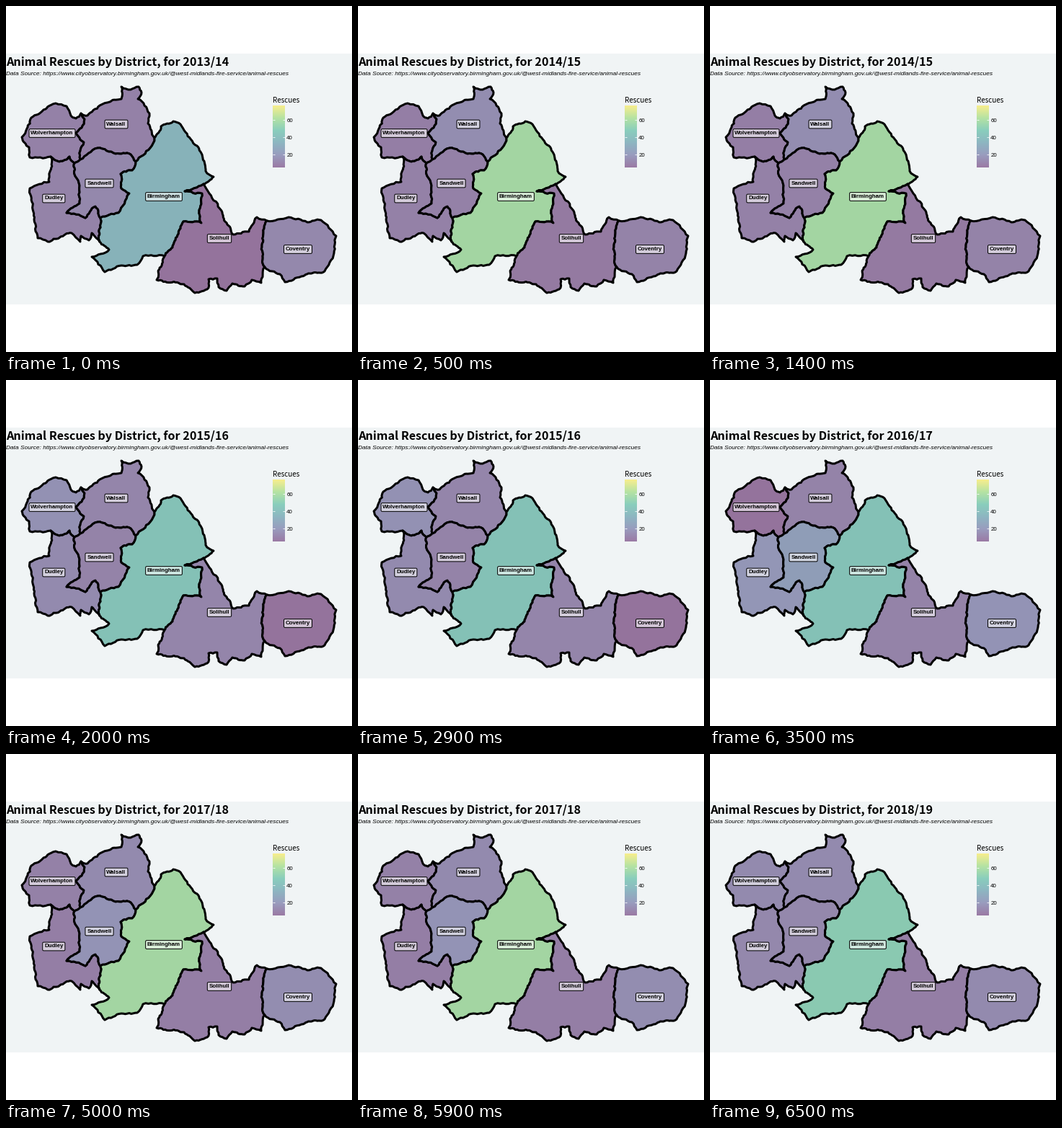
A matplotlib script for the animation above (8 s loop, 480x480 px).

```python
import math
import random

import matplotlib.pyplot as plt
import numpy as np
from matplotlib.animation import FuncAnimation
from matplotlib.colors import LinearSegmentedColormap
from matplotlib.patches import Polygon, Rectangle

SIZE, DPI = 480, 80
PX = 72 / DPI
STEP = 500
FRAMES = 16
LOW, HIGH = 5, 76.7
PANEL = "#f0f4f5"
CMAP = LinearSegmentedColormap.from_list(
    "rescues", ["#440154", "#414487", "#2A788E", "#22A884", "#7AD151", "#FDE725"])

rng = random.Random(7)


def wiggle(a, b):
    """Points after a up to b, with midpoints displaced recursively."""
    dx, dy = b[0] - a[0], b[1] - a[1]
    length = math.hypot(dx, dy)
    if length < 4:
        return [b]
    k = rng.uniform(-1, 1) * min(0.15, 1.5 / length)
    mid = ((a[0] + b[0]) / 2 - k * dy, (a[1] + b[1]) / 2 + k * dx)
    return wiggle(a, mid) + wiggle(mid, b)


def border(*keys):
    path = [keys[0]]
    for a, b in zip(keys, keys[1:]):
        path += wiggle(a, b)
    return path


def ring(*arcs):
    """Join arcs head to tail, turning any that run the other way."""
    path = list(arcs[0])
    for arc in arcs[1:]:
        path += arc if arc[0] == path[-1] else arc[::-1]
    return path


# Corners where borders meet
A, B, C, D = (62, 209), (104, 149), (103, 213), (95, 218)
E, F, G, H = (206, 183), (180, 216), (131, 294), (130, 327)
I, J, K, L = (220, 347), (274, 247), (362, 298), (359, 362)

wolv_out = border(A, (33, 210), (32, 196), (22, 182), (29, 170), (35, 155),
                  (55, 143), (69, 135), (84, 139), (90, 152), (97, 156), B)
wolv_wals = border(B, (109, 157), (105, 169), (97, 176), (108, 189), (103, 201), C)
wolv_sand = border(C, D)
wolv_dud = border(D, (88, 209), (74, 216), A)
wals_out = border(B, (113, 152), (130, 138), (160, 129), (160, 112), (173, 116),
                  (184, 112), (188, 120), (183, 129), (199, 149), (197, 163), E)
wals_birm = border(E, (200, 197), F)
wals_sand = border(F, (173, 206), (152, 205), (127, 197), C)
sand_birm = border(F, (175, 228), (159, 233), (160, 253), (171, 260), (156, 287), G)
sand_dud = border(G, (124, 278), (110, 294), (84, 287), (102, 274), (102, 249),
                  (96, 236), D)
dud_out = border(H, (119, 315), (115, 325), (104, 319), (103, 327), (91, 315),
                 (58, 327), (44, 322), (39, 296), (33, 253), (60, 244), A)
dud_birm = border(G, (129, 311), H)
birm_south = border(H, (143, 338), (119, 348), (137, 369), (160, 360),
                    (182, 359), (190, 347), I)
birm_soli = border(I, (231, 335), (238, 318), (246, 299), (271, 301), (268, 283),
                   (272, 260), (248, 257), J)
birm_east = border(J, (288, 237), (277, 229), (273, 211), (265, 194), (249, 175),
                   (242, 164), (232, 160), (215, 167), E)
soli_north = border(J, (282, 260), (299, 284), (315, 317), (337, 313), (348, 293), K)
soli_cov = border(K, (357, 313), (355, 332), (356, 352), L)
soli_south = border(L, (354, 384), (341, 380), (331, 389), (314, 385), (306, 395),
                    (295, 390), (293, 378), (281, 379), (281, 391), (262, 398),
                    (247, 386), (209, 380), I)
cov_out = border(K, (392, 293), (418, 300), (437, 297), (458, 319), (455, 343),
                 (442, 368), (410, 375), (387, 383), (380, 372), L)

# District: outline, label position, rescues per year
DISTRICTS = {
    "Wolverhampton": (ring(wolv_out, wolv_wals, wolv_sand, wolv_dud),
                      (64, 176.5), (11, 10, 18, 5, 11, 15)),
    "Walsall": (ring(wals_out, wals_birm, wals_sand, wolv_wals),
                (153, 164), (11, 16, 13, 12, 15, 15)),
    "Dudley": (ring(wolv_dud, dud_out, dud_birm, sand_dud),
               (66.3, 267), (12, 11, 15, 20, 10, 14)),
    "Sandwell": (ring(wals_sand, wolv_sand, sand_dud, sand_birm),
                 (129.5, 246), (14, 11, 12, 24, 19, 14)),
    "Birmingham": (ring(wals_birm, sand_birm, dud_birm, birm_south, birm_soli,
                        birm_east),
                   (219, 264.5), (36, 58, 45, 45, 58, 50)),
    "Solihull": (ring(soli_north, soli_cov, soli_south, birm_soli),
                 (296, 322.5), (5, 8, 13, 12, 10, 10)),
    "Coventry": (ring(cov_out, soli_cov),
                 (405, 337.5), (14, 12, 5, 19, 16, 15)),
}


def fill(count):
    """Half-transparent scale colour over a light grey base."""
    rgb = np.array(CMAP((count - LOW) / (HIGH - LOW))[:3])
    return tuple(0.5 * rgb + 0.5 * 0.898)


fig = plt.figure(figsize=(SIZE / DPI, SIZE / DPI), dpi=DPI, facecolor="white")
ax = fig.add_axes([0, 0, 1, 1])
ax.axis("off")


def write(x, y, text, px, font, **kw):
    kw.setdefault("va", "baseline")
    return ax.text(x, y, text, fontsize=px * PX, family=font, **kw)


ax.add_patch(Rectangle((0, 66), SIZE, 348, fc=PANEL, lw=0))

shapes = {}
for name, (path, (x, y), _) in DISTRICTS.items():
    shapes[name] = ax.add_patch(Polygon(path, closed=True, ec="black", lw=3 * PX,
                                        joinstyle="round", zorder=2))
    write(x, y, name, 7.9, "Liberation Sans", weight="bold",
          ha="center", va="center", zorder=4,
          bbox=dict(boxstyle="round,pad=0.3,rounding_size=0.2",
                    fc=(1, 1, 1, 0.6), ec="black", lw=PX))

title = write(0, 83, "", 16.18, "Noto Sans CJK JP", weight="bold")
write(0, 95.7, "Data Source: https://www.cityobservatory.birmingham.gov.uk/"
      "@west-midlands-fire-service/animal-rescues",
      8.36, "Liberation Sans", style="italic")

# Colour bar
write(370, 134, "Rescues", 9.75, "Noto Sans CJK JP")
ax.imshow(np.linspace(1, 0, 86)[:, None], cmap=CMAP, alpha=0.5, aspect="auto",
          extent=(370, 387, 224, 138), zorder=2)
for count in (20, 40, 60):
    y = 230 - 1.2 * count
    for x in (370, 383.6):
        ax.plot([x, x + 3.4], [y, y], color="white", lw=0.8 * PX,
                solid_capstyle="butt", zorder=3)
    write(389.2, y + 2.8, str(count), 7.9, "Liberation Sans")

ax.set_xlim(0, SIZE)
ax.set_ylim(SIZE, 0)


def draw(i):
    year = (i + 2) // 3
    title.set_text(f"Animal Rescues by District, for {2013 + year}/{14 + year}")
    for name, (_, _, counts) in DISTRICTS.items():
        shapes[name].set_facecolor(fill(counts[year]))
    return [title, *shapes.values()]


anim = FuncAnimation(fig, draw, frames=FRAMES, init_func=lambda: draw(0),
                     interval=STEP, repeat=True, repeat_delay=0, blit=False)
plt.show()
```
